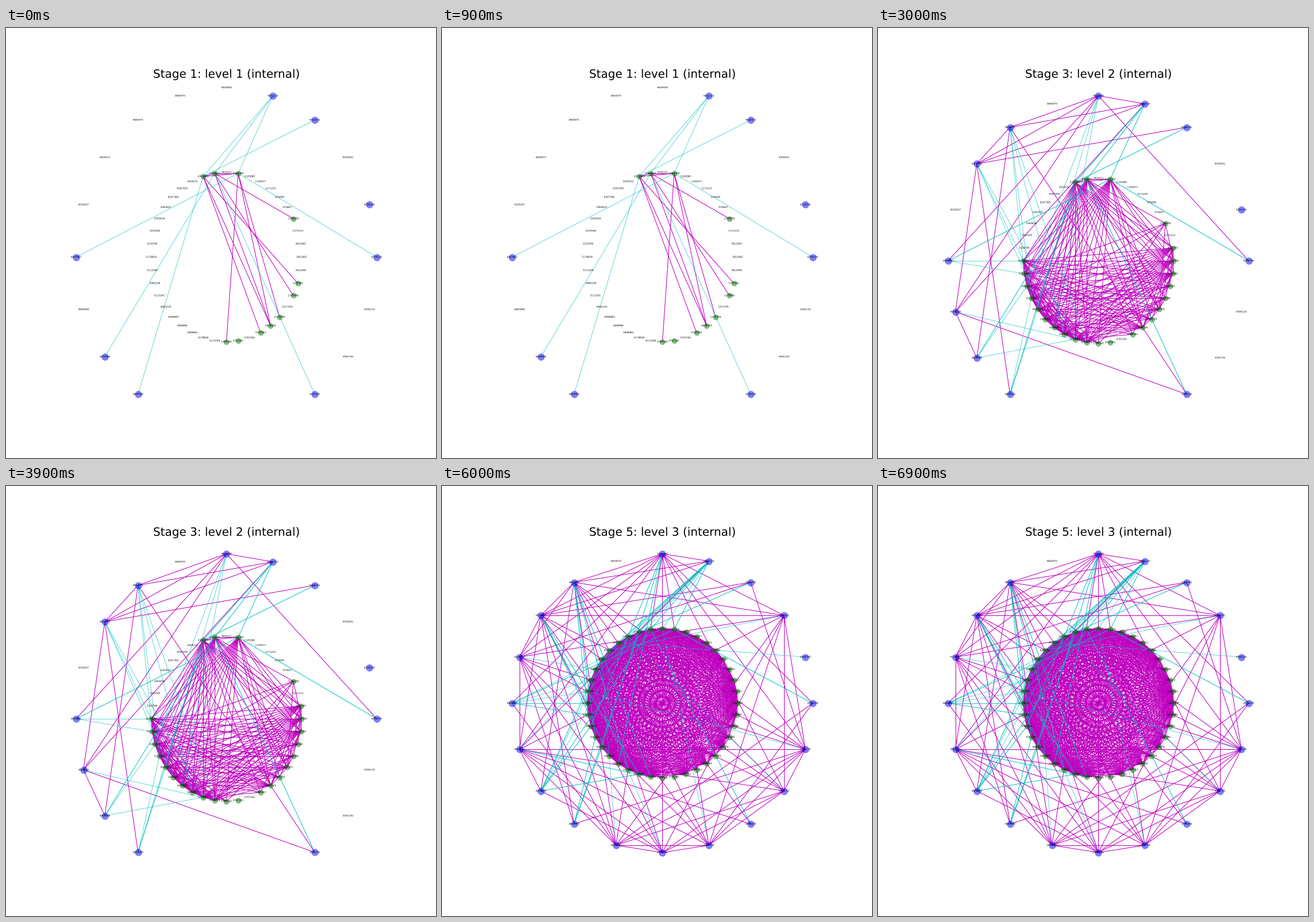
These frames come from a looping animation (748x748 px, 7.5 s). A matplotlib script:

```python
from itertools import combinations

import matplotlib.pyplot as plt
import numpy as np
from matplotlib.animation import ArtistAnimation
from matplotlib.collections import LineCollection, PathCollection
from matplotlib.textpath import TextPath
from matplotlib.transforms import Affine2D

SIZE, DPI = 748, 64
PT = 72 / DPI                       # points per pixel
CX, RX = 383.4, 261.5
EDGE, RIM = 1.04 * PT, 0.52 * PT
LABEL, TITLE = 4.155, 20.0
MAGENTA, CYAN = (0.75, 0, 0.75), (0, 0.75, 0.75)

# A node is a family letter and a member digit; its label is their sum.
BASE = dict(A=6558339, X=6651223, N=4604069, L=4865897, T=4526204,
            U=4395132, V=4591740, a=3812990, b=1171213, c=1105677,
            d=974605, e=6307358, f=3429151, g=3363615, h=3232543,
            p=5178834, q=5113298, r=4982226, s=1808980, t=5767260,
            u=5636144, v=1317478)

# Counter-clockwise from the right.
OUTER = ("A0 A1 A2 A3 X0 N0 N1 N2 N3 T3 L0 L1 L2 L3 "
         "T0 U2 V0 T1 V2 U3").split()
INNER = ("a2 a3 b0 c1 d2 d3 b2 c0 c3 e0 f0 g1 e3 f2 e1 e2 g0 g3 h2 h3 "
         "p0 q0 r2 q3 r3 s3 s0 s2 p2 q1 t0 t1 t2 t3 u0 v0 v1 v2 v3 a0").split()

# Where each inner family leads: a lone letter keeps the member digit.
LEAF = dict(a="N", b="V", c="T", d="U", t="A", u="X", v="L")
HUB = dict(e="A L X0", f="V L X0", g="T L2 X0", h="U L0 X0",
           p="N3 L", q="N2 L", r="N0 L", s="N")
TOUCH = dict(e="N T U V", g="N2 L1")


def edges(rule, inner, outer):
    """Edges from the given inner nodes to those outer nodes in sight."""
    ends = [(n, (o + n[1])[:2]) for n in inner
            for o in rule.get(n[0], "").split()]
    return [e for e in ends if e[1] in outer]


def pair(a, b):
    return tuple(sorted((a, b)))


def ring_of(core, hub_edges, touch_edges):
    """Pairs of outer nodes that are related but share no hub."""
    ends = {}
    for n, o in hub_edges:
        ends.setdefault(n, []).append(o)
    joined = {pair(*p) for group in ends.values()
              for p in combinations(group, 2)}
    found = {pair(*p) for p in combinations(core, 2)}
    found |= {pair(o, c) for n, c in touch_edges for o in ends[n] if o != c}
    return found - joined


def mesh_of(links, ring=()):
    """Inner pairs whose outer nodes coincide or are neighbours."""
    return {pair(a, b) for (a, p), (b, q) in combinations(links, 2)
            if a != b and (p == q or pair(p, q) in ring)}


# What is in sight at each level.
out1 = set("A0 A1 A3 X0 L0 L2 L3 T1".split())
out2 = out1 | set("N0 N2 N3 L1".split())
out3 = set(OUTER) - {"N1"}
core2, core3 = out2 - out1, out3 - out1

hubs1 = ["e0", "g1", "e3"]
hubs2 = [n for n in INNER if n[0] in "pqrs"]
hubs3 = [n for n in INNER if n[0] in "efgh" and n not in hubs1]

tree1, tree2, tree3 = (edges(HUB, h, out3) for h in (hubs1, hubs2, hubs3))
leaf1, leaf2, leaf3 = (edges(LEAF, INNER, o) for o in (out1, out2, out3))
touch2 = edges(TOUCH, hubs1, core2)
touch3 = edges(TOUCH, hubs1 + hubs3, core3)
fresh2 = [e for e in leaf2 if e not in leaf1] + touch2

ring2 = ring_of(core2, tree1 + tree2, touch2)
ring3 = ring2 | ring_of(core3, tree1 + tree2 + tree3, touch3)
mesh1 = mesh_of(tree1 + leaf1)
mesh2 = mesh_of(tree1 + tree2 + leaf2 + touch2, ring2)
mesh3 = mesh_of(tree1 + tree2 + tree3 + leaf3 + touch3, ring3)

in1 = {n for n, _ in tree1 + leaf1}
in2 = {n for n, _ in tree1 + tree2 + leaf2}

fig = plt.figure(figsize=(SIZE / DPI, SIZE / DPI), dpi=DPI, facecolor="white")
ax = fig.add_axes([0, 0, 1, 1])
ax.set(xlim=(0, SIZE), ylim=(0, SIZE))
ax.axis("off")


def circle(nodes, cy, rx, ry):
    t = 2 * np.pi * np.arange(len(nodes)) / len(nodes)
    xy = np.column_stack([CX + rx * np.cos(t), SIZE - cy + ry * np.sin(t)])
    return dict(zip(nodes, xy))


def glyphs(text, size):
    """Text outline centred on x = 0 with its baseline on y = 0."""
    path = TextPath((0, 0), text, size=size)
    box = path.get_extents()
    return path.transformed(Affine2D().translate(-(box.x0 + box.x1) / 2, 0))


def lines(pos, links, color, alpha=1.0):
    segs = [(pos[a], pos[b]) for a, b in links]
    return ax.add_collection(LineCollection(
        segs, colors=[color], alpha=alpha, linewidths=EDGE, zorder=1))


def dots(pos, nodes, diameter, color):
    x, y = zip(*(pos[n] for n in sorted(nodes)))
    return ax.scatter(x, y, s=(diameter * PT) ** 2, c=color, alpha=0.5,
                      linewidths=RIM, zorder=2)


def words(paths, xy):
    return ax.add_collection(PathCollection(
        paths, offsets=xy, offset_transform=ax.transData,
        facecolors="black", linewidths=0, zorder=3))


LABELS = {n: glyphs(str(BASE[n[0]] + int(n[1])), LABEL)
          for n in OUTER + INNER}


def stage(title, cy, ry, ins, outs, mesh=(), ring=(), cyan=(), black=()):
    pos = circle(OUTER, cy, RX, ry) | circle(INNER, cy, RX / 2, ry / 2)
    named = [n for n in LABELS
             if outs == out3 or n not in ("T0", "U2", "V0")]
    spots = np.array([pos[n] for n in named]) - (0, 0.27 * LABEL)
    return [
        lines(pos, sorted(mesh), MAGENTA),
        lines(pos, sorted(ring), MAGENTA),
        lines(pos, cyan, CYAN, 0.6),
        lines(pos, black, "black", 0.6),
        dots(pos, outs, 11.62, "b"),
        dots(pos, ins, 9.0, "g"),
        words([LABELS[n] for n in named], spots),
        words([glyphs(title, TITLE)], [(CX, SIZE - 86.6)]),
    ]


# Repeated edges are overdrawn, so older ones look darker.
stages = [
    stage("Stage 1: level 1 (internal)", 398.5, 294.9, in1, out1,
          mesh=mesh1, cyan=tree1),
    stage("Stage 2: level 1 to level 2", 398.5, 294.9, in1, out1,
          black=tree1 + leaf1),
    stage("Stage 3: level 2 (internal)", 405, 287.1, in2, out2,
          mesh=mesh2, ring=ring2, cyan=tree1 * 2 + tree2),
    stage("Stage 4: level 2 to level 3", 405, 287.1, in2, out2,
          black=tree1 + leaf1 * 2 + tree2 + fresh2),
    stage("Stage 5: level 3 (internal)", 377.8, 259.8, set(INNER), out3,
          mesh=mesh3, ring=ring3, cyan=(tree1 + tree2) * 2 + tree3),
]

anim = ArtistAnimation(fig, stages, interval=1500, repeat=True,
                       repeat_delay=0, blit=False)
plt.show()
```
